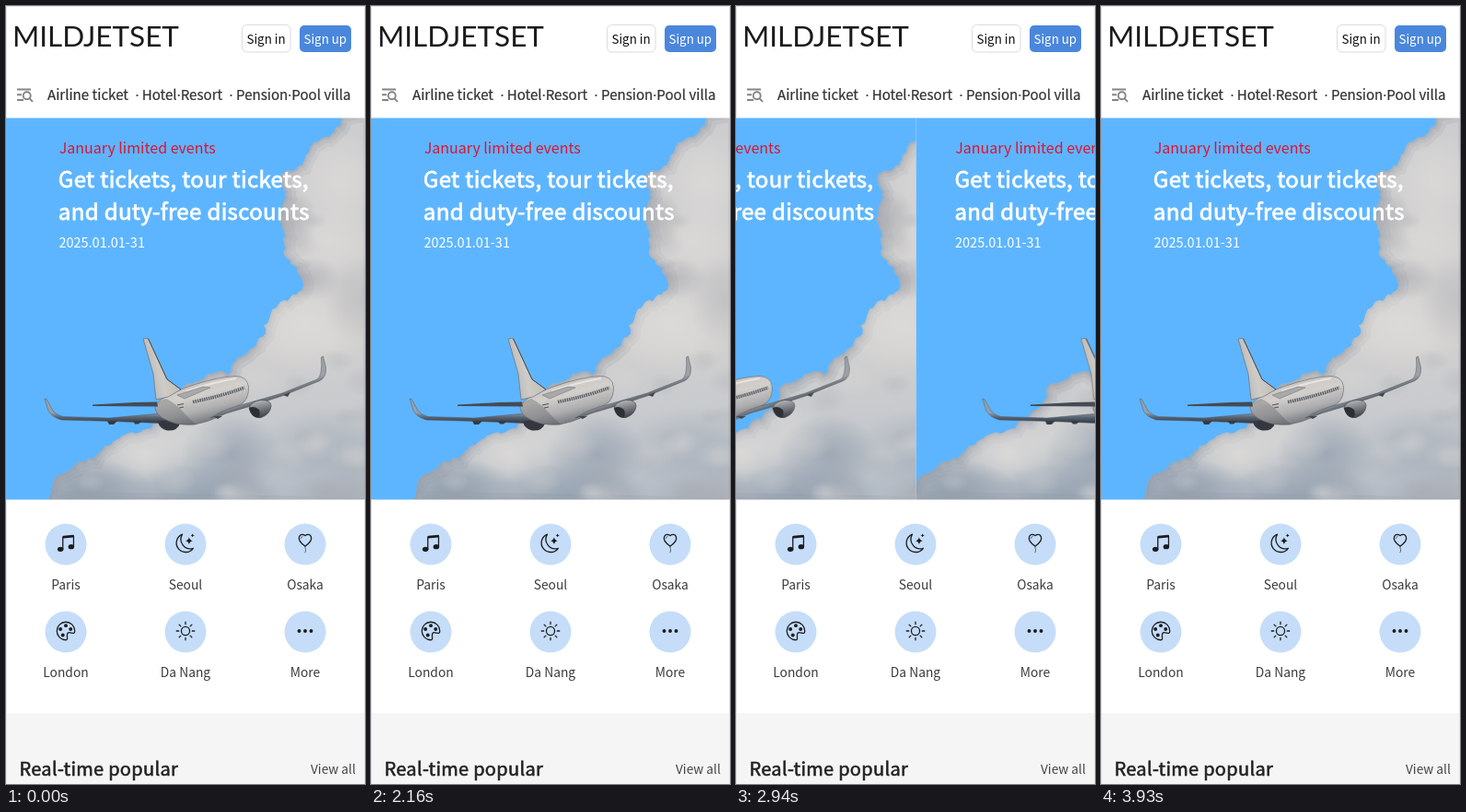
These frames come from a looping animation (390x844 px, 3960 ms). An HTML page with a canvas:

```html
<!DOCTYPE html>
<html lang="en">
<head>
<meta charset="utf-8">
<title>Travel booking</title>
<style>
html, body { margin: 0; width: 100%; height: 100%; overflow: hidden; background: #fff; }
canvas, #ui { position: absolute; left: 0; top: 0; width: 390px; height: 844px; }
text { font-family: "Noto Sans CJK KR", "Noto Sans CJK", "Noto Sans CJK JP", "Noto Sans", sans-serif; white-space: pre; }
.brand { font: 31.5px Lato, sans-serif; fill: #1b1b1b; }
.btn { font-size: 13.33px; }
.nav { font-size: 15.1px; fill: #333; stroke: #333; stroke-width: .015em; }
.nav tspan { font-family: "Open Sans", sans-serif; }
.red { font-size: 16px; fill: #dc1433; }
.head { font-size: 24px; letter-spacing: .015em; fill: #fff; stroke: #fff; stroke-width: .032em; }
.date { font-size: 14.5px; fill: #fff; }
.label { font-size: 13.8px; fill: #3a3a3a; text-anchor: middle; }
.title { font-size: 20px; letter-spacing: .015em; fill: #222; stroke: #222; stroke-width: .03em; }
.more { font-size: 13.7px; fill: #444; }
.icon { fill: #1c1c20; }
.icon .line { fill: none; stroke: #1c1c20; stroke-width: 1; stroke-linecap: round; stroke-linejoin: round; }
</style>
</head>
<body>
<canvas id="stage"></canvas>
<svg id="ui" viewBox="0 0 390 844" xmlns="http://www.w3.org/2000/svg">
  <text class="brand" x="7" y="44.3">MILDJETSET</text>
  <rect x="256.5" y="20.5" width="52.5" height="29.5" rx="5" fill="#fff" stroke="#dcdcdc"/>
  <text class="btn" x="261.5" y="41" fill="#111">Sign in</text>
  <rect x="319" y="21" width="56" height="29" rx="5" fill="#4a87dc"/>
  <text class="btn" x="323.5" y="41" fill="#fff">Sign up</text>

  <g fill="none" stroke="#858585" stroke-width="1.9">
    <path d="M12 90.5H27M12 96.2H17M12 102H19M25.6 100.4L29 103.8"/>
    <circle cx="22.7" cy="97.3" r="4"/>
  </g>
  <text class="nav" x="45" y="101.6">Airline ticket</text>
  <text class="nav" x="140.5" y="101.6"><tspan>·</tspan></text>
  <text class="nav" x="147.7" y="101.6">Hotel<tspan>·</tspan>Resort</text>
  <text class="nav" x="242.5" y="101.6"><tspan>·</tspan></text>
  <text class="nav" x="250" y="101.6">Pension<tspan>·</tspan>Pool villa</text>

  <svg class="slide" y="121.5" width="390" height="414" viewBox="0 121.5 390 414">
    <g>
      <text class="red" x="57.7" y="160">January limited events</text>
      <text class="head" x="56.8" y="197.3">Get tickets, tour tickets,</text>
      <text class="head" x="56.8" y="232.2">and duty-free discounts</text>
      <text class="date" x="57.4" y="261.8">2025.01.01-31</text>
    </g>
  </svg>

  <g id="discs" fill="#c5ddf8"></g>
  <g class="icon" transform="translate(54.6 572.4) scale(1.3)">
    <ellipse cx="3.5" cy="13" rx="2.5" ry="2"/>
    <ellipse cx="12.5" cy="11" rx="2.5" ry="2"/>
    <path d="M5 13V2.9a1 1 0 0 1 .9-1l8-.8a1 1 0 0 1 1.1 1V11h-1V3.1L6 3.9V13z"/>
  </g>
  <g class="icon" transform="translate(184.6 572.4) scale(1.3)">
    <path class="line" d="M5.3 .6A7.7 7.7 0 1 0 14.4 12.2A7.9 7.9 0 0 1 5.3 .6z"/>
    <path d="M11 3q.5 2.5 3 3q-2.5 .5 -3 3q-.5 -2.5 -3 -3q2.5 -.5 3 -3zM13.9 0q.3 1.2 1.6 1.5q-1.3 .3 -1.6 1.5q-.3 -1.2 -1.6 -1.5q1.3 -.3 1.6 -1.5z"/>
  </g>
  <g class="icon" transform="translate(314.6 572.4) scale(1.3)">
    <path class="line" d="M8 10.5C-1.5 4 4.5 -1.6 8 1.7C11.5 -1.6 17.5 4 8 10.5z"/>
    <path class="line" stroke-opacity=".8" d="M8 10.8q-.2 1.4 .4 2.4q.5 1.2 -.5 2.5M4.4 4q.3 -1.4 1.5 -1.8" style="stroke-width:.6"/>
  </g>
  <g class="icon" transform="translate(54.6 667.6) scale(1.3)">
    <path class="line" d="M15.5 8c0 2.5 -1.4 2 -3 1.55C11.2 9.2 10.2 9 9.6 9.7c-.8 .9 -.55 2.1 -.45 3.3c.15 1.5 .2 2.5 -1.15 2.5a7.5 7.5 0 1 1 7.5 -7.5z"/>
    <circle cx="8" cy="3.5" r="1.5"/><circle cx="12" cy="6.5" r="1.5"/>
    <circle cx="3.5" cy="6.5" r="1.5"/><circle cx="5.5" cy="11.5" r="1.5"/>
  </g>
  <g class="icon" transform="translate(184.6 667.6) scale(1.3)">
    <circle class="line" cx="8" cy="8" r="3.5"/>
    <path id="rays" class="line"/>
  </g>
  <g class="icon" transform="translate(314.6 667.6) scale(1.3)">
    <circle cx="3" cy="8" r="1.5"/><circle cx="8" cy="8" r="1.5"/><circle cx="13" cy="8" r="1.5"/>
  </g>
  <text class="label" x="65" y="632.7">Paris</text>
  <text class="label" x="195" y="632.7">Seoul</text>
  <text class="label" x="325" y="632.7">Osaka</text>
  <text class="label" x="65" y="727.7">London</text>
  <text class="label" x="195" y="727.7">Da Nang</text>
  <text class="label" x="325" y="727.7">More</text>

  <rect y="767" width="390" height="77" fill="#f5f5f5"/>
  <text class="title" x="14.5" y="835">Real-time popular</text>
  <text class="more" x="331" y="832.6">View all</text>
  <path d="M.5 121V.5H389.5V121M.5 536V844M389.5 536V844" fill="none" stroke="#e6e6e6"/>
</svg>
<script>
const W = 390, H = 844, TOP = 121.5, HERO = 414, SKY = '#5eb5ff';
const LOOP = 3960, STEP = 30, START = 2625, SPAN = 1077;
const $ = s => document.querySelector(s);
const dpr = window.devicePixelRatio || 1;

function setup(canvas) {
  canvas.width = W * dpr;
  canvas.height = H * dpr;
  const c = canvas.getContext('2d');
  c.scale(dpr, dpr);
  return c;
}

let seed = 11;
const rand = () => (seed = (seed * 16807) % 2147483647) / 2147483647;

// Adds smaller and smaller bumps to an outline.
function roughen(pts, depth) {
  if (!depth) return pts;
  const out = [];
  pts.forEach(([x, y], i) => {
    out.push([x, y]);
    if (i === pts.length - 1) return;
    const [u, v] = pts[i + 1], k = (rand() - 0.4) * 0.4;
    out.push([(x + u) / 2 - (v - y) * k, (y + v) / 2 + (u - x) * k]);
  });
  return roughen(out, depth - 1);
}

function blob(c, x, y, r, rgb, a, squash = 0.7) {
  c.save();
  c.translate(x, y);
  c.scale(1, squash);
  const g = c.createRadialGradient(0, 0, 0, 0, 0, r);
  g.addColorStop(0, `rgba(${rgb},${a})`);
  g.addColorStop(0.5, `rgba(${rgb},${a * 0.6})`);
  g.addColorStop(1, `rgba(${rgb},0)`);
  c.fillStyle = g;
  c.fillRect(-r, -r, 2 * r, 2 * r);
  c.restore();
}

function drawSky(c) {
  c.fillStyle = SKY;
  c.fillRect(0, TOP - 1, W, HERO + 2);
  const edge = roughen([
    [364, 120], [355, 138], [333, 149], [325, 166], [302, 181], [304, 202], [299, 226],
    [304, 250], [302, 268], [317, 284], [323, 304], [306, 320], [286, 340], [272, 368],
    [255, 381], [240, 400], [214, 405], [192, 414], [172, 448], [141, 464], [114, 476],
    [96, 491], [74, 501], [52, 514], [45, 537]
  ], 3);
  c.save();
  c.beginPath();
  c.moveTo(W + 9, TOP - 9);
  edge.forEach(p => c.lineTo(...p));
  c.lineTo(W + 9, TOP + HERO + 9);
  c.closePath();
  const g = c.createLinearGradient(230, 190, 250, 535);
  g.addColorStop(0, '#cdcdcf');
  g.addColorStop(0.5, '#d2d1d0');
  g.addColorStop(0.8, '#c5c8cc');
  g.addColorStop(1, '#b3bbc4');
  c.fillStyle = g;
  c.fill();
  c.clip();
  c.strokeStyle = 'rgba(135,143,154,.17)';
  for (const w of [22, 13, 6, 3]) {
    c.lineWidth = w;
    c.stroke();
  }
  const light = '222,220,217', shade = '137,151,168', gray = '164,166,172';
  blob(c, 362, 190, 55, light, 0.7, 1);
  blob(c, 350, 255, 60, light, 0.7);
  blob(c, 325, 345, 75, light, 0.8);
  blob(c, 310, 232, 28, gray, 0.6, 1.2);
  blob(c, 330, 296, 34, gray, 0.5);
  blob(c, 384, 320, 40, gray, 0.35, 1.2);
  blob(c, 150, 484, 50, light, 0.8);
  blob(c, 205, 468, 50, light, 0.6);
  blob(c, 90, 526, 70, shade, 0.8, 0.5);
  blob(c, 245, 486, 55, shade, 0.6, 0.8);
  blob(c, 215, 530, 85, shade, 0.65, 0.4);
  blob(c, 350, 480, 75, shade, 0.35, 0.6);
  blob(c, 365, 530, 60, gray, 0.6, 0.4);
  for (let i = 0; i < 70; i++) {
    const y = TOP + HERO * Math.sqrt(rand());
    blob(c, W * rand(), y, 12 + 16 * rand(), i % 2 ? light : gray, 0.25);
  }
  c.restore();
}

function shape(c, d, fill, stroke, width = 0.8) {
  const p = new Path2D(d);
  if (fill) { c.fillStyle = fill; c.fill(p); }
  if (stroke) { c.strokeStyle = stroke; c.lineWidth = width; c.stroke(p); }
}

function shades(c, x0, y0, x1, y1, ...colors) {
  const g = c.createLinearGradient(x0, y0, x1, y1);
  colors.forEach((k, i) => g.addColorStop(i / (colors.length - 1), k));
  return g;
}

function drawPlane(c) {
  // left wing
  shape(c, 'M42 426L44 426.5L51 439Q55 444 62 445.5L112 447L168 442L184 451L166 452.5L115 450.5L60 449Q50 446 46 439Z',
    shades(c, 0, 441, 0, 452, '#98a1aa', '#566270', '#343b45'), '#4b545f', 0.5);
  shape(c, 'M110 450h11l-4 4h-5zM138 450h10l-4 3.5h-4z', '#363b43');
  shape(c, 'M165 451Q177 447 189 453Q186 461.5 175 460.5Q167 459 165 451Z', '#34373d');

  // fuselage
  shape(c, 'M162 433Q170 423 198 413Q230 402 250 401.5Q262 402 263.5 413Q264 424 258 430Q232 449 205 454Q185 456 170 447Q161 441 162 433Z',
    shades(c, 205, 406, 217, 455, '#c9c6c2', '#d3d0cc', '#aeaeaf', '#696c73'), '#63666c', 0.6);
  shape(c, 'M162 433Q166 428 174 426Q183 430 194 442Q201 450 207 454Q185 456 170 447Q161 441 162 433Z', 'rgba(67,70,78,.3)');
  c.setLineDash([1.5, 0.9]);
  shape(c, 'M203 429.5Q235 423 259 414', null, '#5a5f68', 3.6);
  c.setLineDash([]);
  shape(c, 'M186 433l7-1.5M188 436l5-1', null, '#555', 1.2);
  shape(c, 'M196 418Q225 408 250 404', null, 'rgba(238,236,232,.8)', 2.2);

  // tail
  shape(c, 'M149 361L154.5 360.5L175 405L190 416L176 424L163 427L160 399Z',
    shades(c, 150, 400, 185, 392, '#b4b3b2', '#cfccc8', '#c0bdb9'), '#6c6e72', 0.7);
  shape(c, 'M154.5 361L175 405L190 416', null, '#4b4d52', 1);
  shape(c, 'M94 432.5L140 430L164 429.5L165 434.5L130 434.3L94 434Z', '#444b54');
  shape(c, 'M186 422L214 413L222 414L194 426Z', '#a9a9a9', '#777a7e', 0.6);

  // right wing and engine
  shape(c, 'M222 447Q236 437 262 431L300 420L338 405Q344 401 342.5 381L344.5 380L347.5 392Q348 403 341 406.5L300 423L266 434Z',
    shades(c, 280, 422, 284, 434, '#9da2a8', '#646b74', '#42474f'), '#4f555d', 0.5);
  shape(c, 'M264 436Q266 429 277 427.5Q288 427 288 434Q287 443 277 446.5Q267 448 264 436Z',
    shades(c, 274, 428, 278, 447, '#b4b5b6', '#74777e', '#383b42'), '#3c3f45', 0.6);
  shape(c, 'M264 436Q270 433 275 438Q277 443 274 446.5Q266 446 264 436Z', '#2c2f35');
  shape(c, 'M225 445h10l-5 3zM301 422l8-3-3 5z', '#42464d');
}

function layer(draw) {
  const canvas = document.createElement('canvas');
  draw(setup(canvas));
  return canvas;
}

// Cubic curve (.25,.1) (.25,1)
function ease(x) {
  if (x <= 0) return 0;
  if (x >= 1) return 1;
  let lo = 0, hi = 1;
  for (let i = 0; i < 24; i++) {
    const s = (lo + hi) / 2;
    if (0.75 * s * (1 - s) + s ** 3 < x) lo = s; else hi = s;
  }
  return 0.3 * lo * (1 - lo) ** 2 + 3 * lo * lo * (1 - lo) + lo ** 3;
}

for (const y of [584, 679])
  for (const x of [65, 195, 325])
    $('#discs').innerHTML += `<circle cx="${x}" cy="${y}" r="22.5"/>`;

let rays = '';
for (let i = 0; i < 8; i++) {
  const u = Math.cos(i * Math.PI / 4), v = Math.sin(i * Math.PI / 4);
  rays += `M${8 + 5.6 * u} ${8 + 5.6 * v}L${8 + 7.5 * u} ${8 + 7.5 * v}`;
}
$('#rays').setAttribute('d', rays);

const first = $('.slide');
const second = first.cloneNode(true);
first.after(second);
const slides = [first, second];
const sky = layer(drawSky), plane = layer(drawPlane);
const ctx = setup($('#stage'));

// Text, sky and plane each travel at their own pace inside a slide.
function drawSlide(i, p) {
  const d = i - p, x = W * d;
  slides[i].setAttribute('x', x);
  slides[i].firstElementChild.setAttribute('transform', `translate(${-30 * d} 0)`);
  if (Math.abs(d) >= 1) return;
  ctx.save();
  ctx.beginPath();
  ctx.rect(x, TOP, W, HERO);
  ctx.clip();
  ctx.drawImage(sky, 290 * d, 0, W, H);
  ctx.drawImage(plane, 450 * d, 0, W, H);
  ctx.restore();
}

function frame() {
  const t = Math.floor(performance.now() % LOOP / STEP) * STEP;
  const p = ease((t - START) / SPAN);
  ctx.fillStyle = '#fff';
  ctx.fillRect(0, 0, W, H);
  drawSlide(0, p);
  drawSlide(1, p);
  requestAnimationFrame(frame);
}
frame();
</script>
</body>
</html>
```
